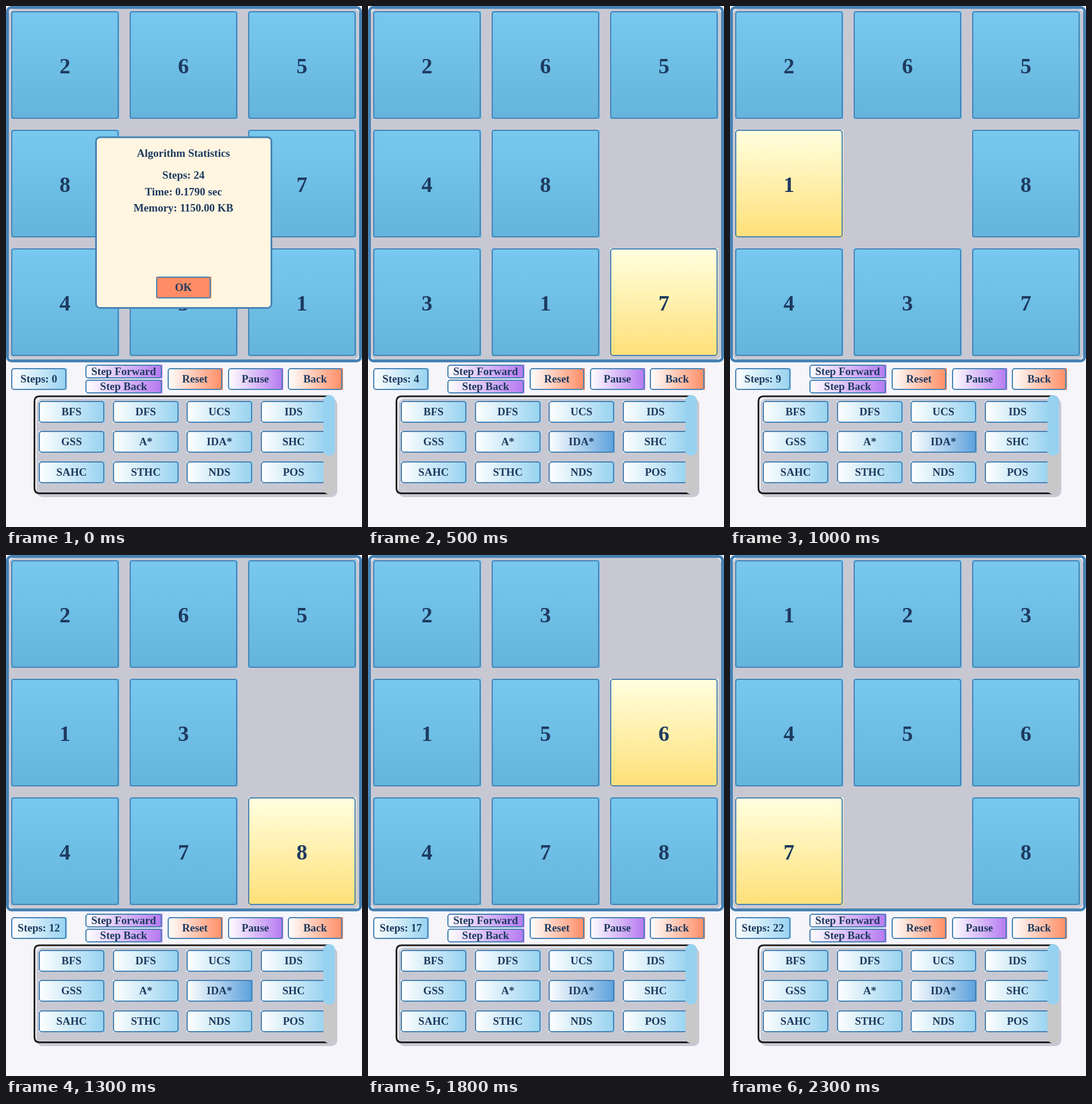
Animation, 619 px wide and 905 px high, one loop 2400 ms. Source, as an HTML page:

```html
<!DOCTYPE html>
<html lang="en">
<head>
<meta charset="utf-8">
<title>Sliding puzzle solver</title>
<style>
  html, body { margin: 0; width: 100%; height: 100%; overflow: hidden; background: #f5f5fa; }
  svg { display: block; }
  text { font: bold 19px "Liberation Serif", "Times New Roman", serif; fill: #1e3a5f; text-anchor: middle; }
  .digit { font-size: 38px; }
  .edge { fill: none; stroke: #4682b4; stroke-width: 2; }
</style>
</head>
<body>
<svg id="stage" width="619" height="905" viewBox="0 0 619 905">
  <defs id="defs"></defs>
  <rect x="1" y="1" width="617" height="617" rx="8" fill="#fafaff"/>
  <rect x="5" y="5" width="609" height="609" rx="9" fill="#c8c8d2"/>
  <rect x="2.5" y="2.5" width="614" height="614" rx="7" class="edge" style="stroke-width:5"/>
  <g id="board"></g>
  <g id="controls"></g>
  <rect x="53" y="682" width="523" height="171" rx="10" fill="#c8c8d2"/>
  <path d="M562 678H58Q49.500 678 49.500 687V837Q49.500 846.500 58 846.500H562" fill="none" stroke="#1e1e1e" stroke-width="3"/>
  <g id="panel"></g>
  <rect x="552" y="677" width="20" height="171" rx="9" fill="#c8c8c8"/>
  <rect x="552" y="676" width="20" height="105" rx="9.500" fill="#96d2f0"/>
  <g id="dialog">
    <rect x="156.500" y="228" width="305" height="296.500" rx="7" fill="#fff5e1" stroke="#4682b4" stroke-width="3"/>
  </g>
</svg>
<script>
const NS = "http://www.w3.org/2000/svg";
const STEP = 100;
const START = "2658 7431";
// Cell the blank moves into at each step
const PATH = "36785476347852145210367";

const byId = id => document.getElementById(id);

function add(parent, tag, attrs, content = "") {
  const el = document.createElementNS(NS, tag);
  for (const key in attrs) el.setAttribute(key, attrs[key]);
  el.textContent = content;
  parent.append(el);
  return el;
}

function gradient(id, from, to, vertical) {
  const g = add(byId("defs"), "linearGradient", vertical ? { id, x2: 0, y2: 1 } : { id });
  add(g, "stop", { offset: 0, "stop-color": from });
  add(g, "stop", { offset: 1, "stop-color": to });
}

gradient("tile", "#78c8f0", "#64b4dc", true);
gradient("moved", "#ffffe0", "#ffe078", true);
gradient("blue", "#fff", "#96d2f0");
gradient("active", "#fff", "#5aa0dc");
gradient("purple", "#fff", "#b478f0");
gradient("orange", "#fff", "#ff8c64");

const paint = name => `url(#${name})`;

function box(parent, x, y, w, h, fill) {
  const face = add(parent, "rect", { x, y, width: w + 1, height: h, fill });
  add(parent, "rect", { x: x + 1, y: y + 1, width: w - 2, height: h - 2, rx: 4, class: "edge" });
  return face;
}

const label = (parent, x, y, content) => add(parent, "text", { x, y, }, content);

function button(parent, x, y, w, h, fill, content) {
  const face = box(parent, x, y, w, h, paint(fill));
  const text = label(parent, x + w / 2, y + Math.round(h / 2) + 6, content);
  return { face, text };
}

const tiles = [...START].map((_, i) => {
  const x = 9 + 206 * (i % 3), y = 9 + 206 * Math.floor(i / 3);
  const group = add(byId("board"), "g", {});
  const face = box(group, x, y, 187, 187, paint("tile"));
  const digit = add(group, "text", { x: x + 93.5, y: y + 108, class: "digit" });
  return { group, face, digit };
});

const controls = byId("controls");
const counter = button(controls, 9, 629, 96, 38, "blue", "Steps: 0").text;
button(controls, 138, 623, 133, 24, "purple", "Step Forward");
button(controls, 138, 649, 133, 24, "purple", "Step Back");
button(controls, 281, 629, 95, 38, "orange", "Reset");
button(controls, 386, 629, 95, 38, "purple", "Pause");
button(controls, 490, 629, 95, 38, "orange", "Back");

const names = "BFS DFS UCS IDS GSS A* IDA* SHC SAHC STHC NDS POS".split(" ");
const buttons = names.map((name, i) => button(
  byId("panel"),
  Math.round(57 + 128.6 * (i % 4)), Math.round(686 + 52.4 * Math.floor(i / 4)),
  114, 38, "blue", name));
const solver = buttons[names.indexOf("IDA*")].face;

const dialog = byId("dialog");
label(dialog, 308.5, 262, "Algorithm Statistics");
label(dialog, 308.5, 300, "Steps: 24");
label(dialog, 308.5, 329, "Time: 0.1790 sec");
label(dialog, 308.5, 357, "Memory: 1150.00 KB");
box(dialog, 261, 470, 95, 38, "#ff8c64");
label(dialog, 308.5, 495, "OK");

const states = [{ cells: [...START], moved: -1 }];
for (const next of PATH) {
  const cells = [...states[states.length - 1].cells];
  const blank = cells.indexOf(" ");
  cells[blank] = cells[next];
  cells[next] = " ";
  states.push({ cells, moved: blank });
}

let shown = -1;
function show(n) {
  if (n === shown) return;
  shown = n;
  const { cells, moved } = states[n];
  tiles.forEach((tile, i) => {
    tile.group.setAttribute("visibility", cells[i] === " " ? "hidden" : "visible");
    tile.face.setAttribute("fill", paint(i === moved ? "moved" : "tile"));
    tile.digit.textContent = cells[i];
  });
  counter.textContent = "Steps: " + Math.max(0, n - 1);
  solver.setAttribute("fill", paint(n ? "active" : "blue"));
  dialog.setAttribute("visibility", n ? "hidden" : "visible");
}

const begin = performance.now();
function tick() {
  show(Math.floor((performance.now() - begin) / STEP) % states.length);
  requestAnimationFrame(tick);
}
tick();
</script>
</body>
</html>
```
